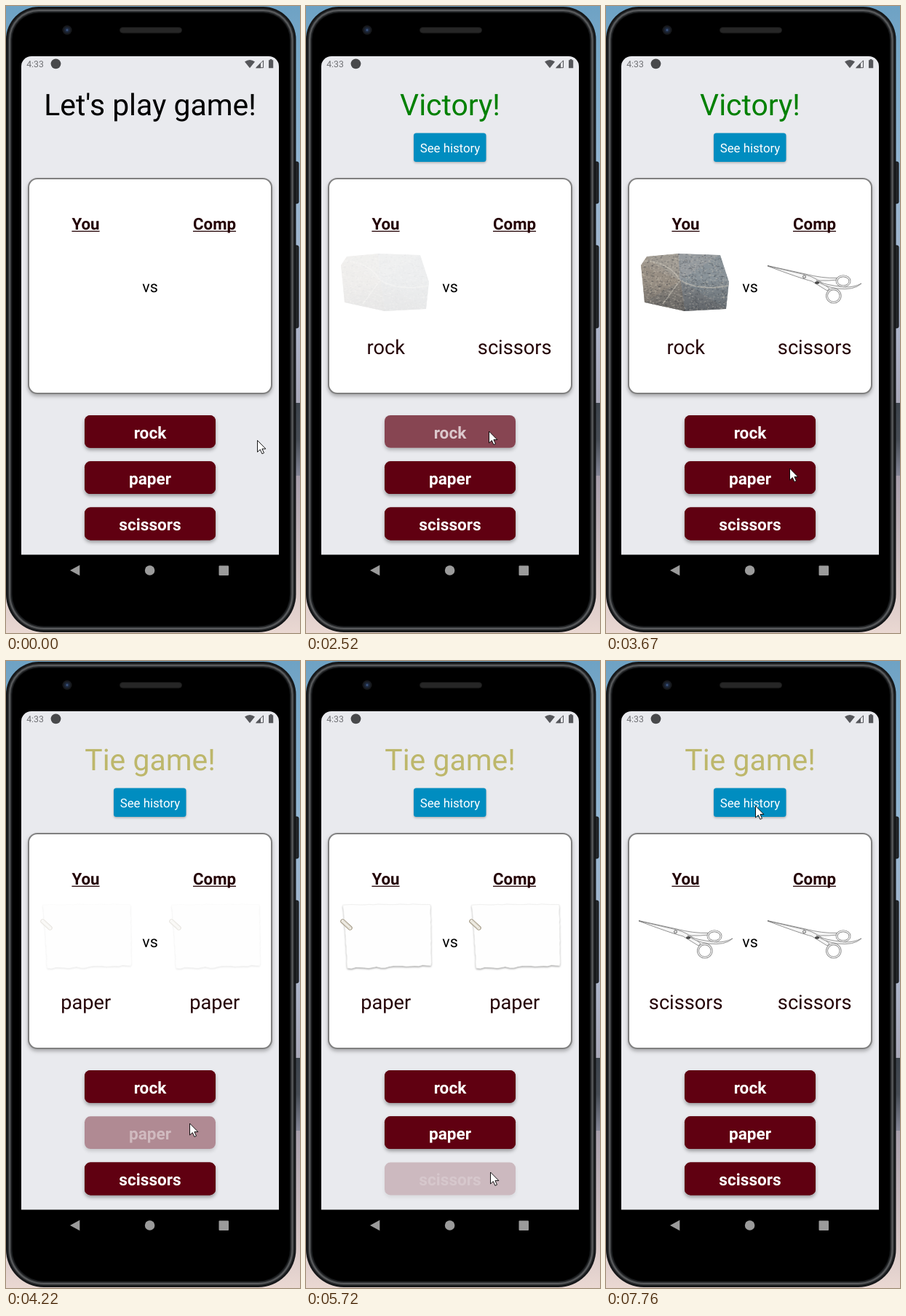
Recreate the animation shown at these times as an HTML page with a canvas. Size 404 by 861 pixels, loop 8000 ms.

```html
<!DOCTYPE html>
<html lang="en">
<head>
<meta charset="utf-8">
<title>Rock, paper, scissors</title>
<style>
  html, body { margin: 0; width: 100%; height: 100%; overflow: hidden; background: #000; }
  canvas { display: block; width: 404px; height: 861px; }
</style>
</head>
<body>
<canvas id="stage" width="404" height="861"></canvas>
<script>
const W = 404, H = 861, LOOP = 8000, TAU = Math.PI * 2;
const MID = 198;          // centre line of the phone
const SLOT = 177;         // distance between the two players
const PANEL = '#e9eaee', INK = '#240306', GREY = '#55565a';

const screenCtx = document.getElementById('stage').getContext('2d');
let ctx = screenCtx;

const clamp = v => Math.max(0, Math.min(1, v));
const ease = v => v < 0.5 ? 2 * v * v : 1 - 2 * (1 - v) * (1 - v);
const span = (t, a, b) => clamp((t - a) / (b - a));

function paint(shape, fill, stroke, line = 1) {
  if (fill) { ctx.fillStyle = fill; ctx.fill(shape); }
  if (stroke) { ctx.strokeStyle = stroke; ctx.lineWidth = line; ctx.stroke(shape); }
}

function box(x, y, w, h, r, ...style) {
  const p = new Path2D();
  p.roundRect(x, y, w, h, r);
  paint(p, ...style);
}

function oval(x, y, rx, ry, ...style) {
  const p = new Path2D();
  p.ellipse(x, y, rx, ry, 0, 0, TAU);
  paint(p, ...style);
}

const path = (d, ...style) => paint(new Path2D(d), ...style);
const outline = pts => new Path2D('M' + pts.map(p => p.join(' ')).join('L') + 'Z');

function text(str, x, y, size, color, weight = 400) {
  ctx.font = `${weight} ${size}px Roboto, sans-serif`;
  ctx.textAlign = 'center';
  ctx.textRendering = 'geometricPrecision';
  ctx.fillStyle = color;
  ctx.fillText(str, x, y);
}

function shadow(alpha = 0, blur = 0, dy = 0) {
  ctx.shadowColor = `rgba(0,0,0,${alpha})`;
  ctx.shadowBlur = blur;
  ctx.shadowOffsetY = dy;
}

// Opaque plate that casts a shadow around itself only
function plate(x, y, w, h, r, color, alpha, blur, dy) {
  shadow(alpha, blur, dy);
  box(x, y, w, h, r, color);
  shadow();
}

function layer(draw) {
  const c = document.createElement('canvas');
  c.width = W;
  c.height = H;
  ctx = c.getContext('2d');
  draw();
  ctx = screenCtx;
  return c;
}

function random(seed) {
  return () => (seed = (seed * 16807) % 2147483647) / 2147483647;
}

function gradient(y0, y1, colors) {
  const g = ctx.createLinearGradient(0, y0, 0, y1);
  colors.forEach((c, i) => g.addColorStop(i / (colors.length - 1), c));
  return g;
}

function drawBackdrop() {
  ctx.fillStyle = gradient(0, H, ['#6ea2c4', '#93b6d2', '#adb6cb', '#a89fab', '#ead8d2']);
  ctx.fillRect(0, 0, W, H);
  ctx.fillStyle = gradient(545, 645, ['#3c434b', '#474d55', '#858797']);
  ctx.fillRect(0, 545, W, 100);
}

function drawCase() {
  for (const [y, h] of [[214, 57], [329, 113]]) box(396, y, 6, h, 2, '#24272a', '#0e0f10');
  for (let i = 0; i < 9; i++) {
    const v = 20 + 75 * Math.exp(-(((i - 4.5) / 1.6) ** 2));
    const top = 45 - i, low = 52 - i;
    box(i, 1 + i, 398.5 - 2 * i, 859 - 2 * i, [top, top, low, low], `rgb(${v},${v + 2},${v + 4})`);
  }
  box(8.5, 9.5, 381.5, 842, [37, 37, 44, 44], '#000');

  ['#17191d', '#1c2638', '#3a527c'].forEach((c, i) => oval(84, 33, 6.5 - 2.4 * i, 6.5 - 2.4 * i, c));
  box(156.5, 29.5, 85, 7.5, 3.7, '#262626', '#1a1a1a');
}

function drawBars() {
  text('4:33', 40, 84, 12.2, '#6d6e72');
  oval(68.5, 79.3, 6.9, 6.9, '#48494b');
  path('M328 76.5Q335 71.5 342 76.5L335 85.3Z', GREY);
  path('M343.8 84.7L353.5 75V84.7Z', null, GREY);
  path('M343 85.2L350 78V85.2Z', GREY);
  path('M361 74.3H362.7V73H365.5V74.3H367.2V85.3H361Z', GREY);

  const nav = '#9b9b9b';
  path('M88 775L101.3 767.8V782.2Z', nav);
  oval(197.6, 775, 6.8, 6.8, nav);
  box(292.5, 768.5, 13.5, 13.5, 1, nav);
}

function heading(str, x) {
  text(str, x, 307, 22.3, INK, 700);
  const w = ctx.measureText(str).width;
  ctx.fillRect(x - w / 2, 308.7, w, 1.3);
}

function drawPhone() {
  drawBackdrop();
  drawCase();
  box(21, 69, 354, 684.5, [14, 14, 0, 0], PANEL);
  drawBars();
  plate(30, 236, 336, 297, 13, '#808080', 0.28, 5, 3);
  box(32, 238, 332, 293, 11, '#fff');
  heading('You', 109.5);
  heading('Comp', 109.5 + SLOT);
  text('vs', MID, 393, 21.5, '#000');
}

// Facets meet at a hub; each is shaded by the way it faces
function drawRock() {
  const rnd = random(11), hub = [102, 377];
  const edge = [[48, 356], [56, 344], [100, 340], [157, 342], [169, 379], [165, 416], [108, 419], [53, 407]];
  ctx.save();
  ctx.clip(outline(edge));
  edge.forEach((p, i) => {
    const q = edge[(i + 1) % edge.length];
    const a = Math.atan2((p[1] + q[1]) / 2 - hub[1], (p[0] + q[0]) / 2 - hub[0]);
    const lum = 143 - 14 * Math.sin(a), cool = 9 * Math.cos(a);
    const color = `rgb(${lum - cool},${lum},${lum + cool - 2})`;
    paint(outline([hub, p, q]), color, color);
  });
  ctx.fillStyle = gradient(380, 420, ['rgba(60,62,66,0)', 'rgba(60,62,66,.45)']);
  ctx.fillRect(40, 380, 140, 40);
  path('M53 350Q88 352 102 377L78 409M102 377Q130 392 168 384', null, 'rgba(205,200,188,.6)', 1.5);
  for (let i = 0; i < 1600; i++) {
    ctx.fillStyle = rnd() > 0.5 ? 'rgba(222,214,200,.25)' : 'rgba(40,46,54,.25)';
    ctx.fillRect(47 + rnd() * 124, 339 + rnd() * 82, 0.8 + rnd() * 2, 0.7 + rnd());
  }
  ctx.restore();
}

// A sheet with torn sides and a clip on its left
function drawPaper() {
  const rnd = random(5), pts = [];
  const corners = [[51, 335], [171, 334], [172, 418], [57, 422]];
  corners.forEach(([x, y], c) => {
    const [x2, y2] = corners[(c + 1) % 4];
    for (let k = 0; k < 1; k += 0.05) {
      const rough = c === 2 ? 2.6 : 1.2;
      pts.push([x + (x2 - x) * k + (rnd() - 0.5), y + (y2 - y) * k + (rnd() - 0.5) * rough]);
    }
  });
  const sheet = outline(pts);
  shadow(0.38, 2.5, 1.5);
  paint(sheet, '#fefefe');
  shadow();
  paint(sheet, null, '#eeeeec', 0.8);

  ctx.translate(55.5, 362);
  ctx.rotate(0.74);
  box(-9.5, -2.6, 19, 5.2, 2.6, '#f6f4ee', '#aaa18e', 1.2);
  box(-6.5, -1, 13.5, 2.2, 1.1, null, '#cfc8b9', 0.7);
}

function drawScissors() {
  const ink = '#6a6a6a', steel = '#f6f6f6';
  ctx.lineJoin = 'round';
  path('M45 356.5L97 368Q120 374 141 373.5V376Q118 379 95 374.5Z', steel, ink, 0.7);
  path('M45 357Q90 374 106 378L127 391L130 388Q113 373 97 369Z', steel, ink, 0.7);
  path('M112 377Q122 383 152 386Q165 386 174 381Q164 391 140 388Q122 385 112 377Z', steel, ink, 0.7);
  for (const [x, y, rx, ry] of [[149, 377.8, 9, 7], [135.8, 398, 9.3, 9.2]]) {
    oval(x, y, rx, ry, null, ink, 2.8);
    oval(x, y, rx, ry, null, steel, 1.5);
  }
  oval(95.5, 371.8, 2, 2, '#e4e4e4', ink);
  oval(113, 380, 3, 1.8, '#444');
}

const base = layer(drawPhone);
const art = { rock: layer(drawRock), paper: layer(drawPaper), scissors: layer(drawScissors) };

// lag: delay of the second picture
const rounds = [
  { at: 2470, title: 'Victory!', color: '#008000', hands: ['rock', 'scissors'], lag: 100 },
  { at: 4140, title: 'Tie game!', color: '#bdb76b', hands: ['paper', 'paper'], lag: 0 },
  { at: 5730, title: 'Tie game!', color: '#bdb76b', hands: ['scissors', 'scissors'], lag: 0 }
];

const buttons = [
  { label: 'rock', down: 2250, dip: 120, up: 2378 },
  { label: 'paper', down: 3979, dip: 1, up: 4130 },
  { label: 'scissors', down: 5560, dip: 130, up: 5700 }
];

const moves = [
  { from: 640, to: 1510, x: 251.5, y: 584 },
  { from: 3260, to: 3670, x: 252.5, y: 635 },
  { from: 4890, to: 5430, x: 253.5, y: 702 },
  { from: 7130, to: 7760, x: 205.5, y: 199 }
];

function pointer(t) {
  let x = 345.5, y = 596.5;
  for (const m of moves) {
    const k = ease(span(t, m.from, m.to));
    x += (m.x - x) * k;
    y += (m.y - y) * k;
  }
  ctx.save();
  ctx.translate(x, y);
  path('M0 0V16L3.8 12.6L6.4 18.4L9 17.2L6.4 11.6H11.4Z', '#fff', '#000', 0.9);
  ctx.restore();
}

function result(t) {
  const r = rounds.filter(q => t >= q.at).pop();
  text(r ? r.title : "Let's play game!", MID, 150.3, 40.9, r ? r.color : '#000');
  if (!r) return;
  plate(148, 174.5, 99.5, 39.5, 3.5, '#008dc0', 0.25, 3, 1.5);
  text('See history', MID, 201, 16.8, '#fff');
  r.hands.forEach((name, i) => {
    const start = r.at + 10 + i * r.lag;
    ctx.globalAlpha = span(t, start, start + 280);
    ctx.drawImage(art[name], i * SLOT, 0);
    ctx.globalAlpha = 1;
    text(name, 109.7 + i * SLOT, 477.6, 27.2, INK);
  });
}

function button(b, i, t) {
  const y = 562 + 63.3 * i;
  const drop = 0.8 * ease(span(t, b.down, b.down + b.dip));
  const alpha = 1 - drop * (1 - ease(span(t, b.up, b.up + 250)));
  plate(108, y, 180, 44.8, 8, alpha < 1 ? PANEL : '#600011', 0.35 * alpha, 5, 3);
  ctx.globalAlpha = alpha;
  box(108, y, 180, 44.8, 8, '#600011');
  text(b.label, MID, y + 31.8, 22.6, '#fff', 700);
  ctx.globalAlpha = 1;
}

function frame() {
  const t = performance.now() % LOOP;
  ctx.drawImage(base, 0, 0);
  result(t);
  buttons.forEach((b, i) => button(b, i, t));
  pointer(t);
  requestAnimationFrame(frame);
}
frame();
</script>
</body>
</html>
```
